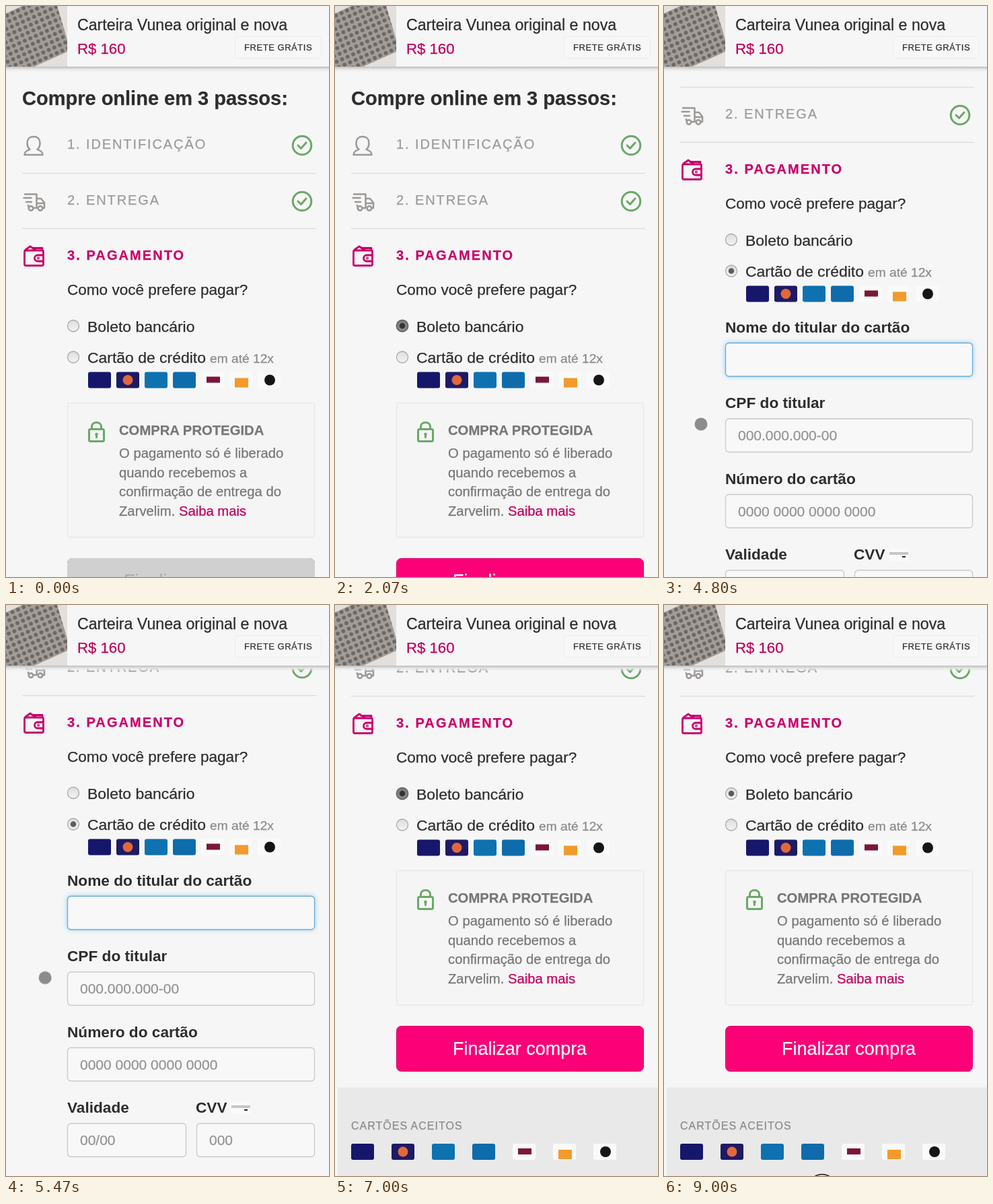
Write an HTML page that moves like this. It is 480 px wide and 848 px high and loops after 9.07 s.

```html
<!DOCTYPE html>
<html lang="pt-BR">
<head>
<meta charset="utf-8">
<title>Pagamento</title>
<style>
  html, body { margin: 0; width: 100%; height: 100%; overflow: hidden; background: #f6f6f6; }
  svg { display: block; width: 480px; height: 848px; }
  text {
    font-family: "Liberation Sans", Arial, Helvetica, sans-serif; white-space: pre;
    color: #2d2d2d; fill: currentColor; stroke: currentColor; stroke-width: .25px;
  }
  .step { font-size: 20px; letter-spacing: 1.9px; color: #9a9a9a; }
  .step.on { font-weight: bold; letter-spacing: 2.07px; color: #c8006b; }
  .option { font-size: 22.95px; }
  .note { font-size: 20.25px; color: #777; }
  .link { color: #c1005f; fill: currentColor; stroke: currentColor; }
  .label { font-size: 22.65px; font-weight: bold; stroke: none; }
  .hint { font-size: 21px; color: #939393; }
  .muted { color: #8a8a8a; }
  .icon { fill: none; stroke: #9c9896; stroke-width: 2.5; stroke-linejoin: round; stroke-linecap: round; }
  .icon.pink { stroke: #c8006b; stroke-width: 2.8; }
  .icon.green { stroke: #6aa967; stroke-width: 3; }
  .rule { stroke: #dedede; stroke-width: 1.5; }
  .field { fill: #f8f8f8; stroke: #c9c9c9; stroke-width: 1.3; }

  .anim { animation: 9070ms infinite; }
  .swap { animation-timing-function: step-end; }
  #page { animation-name: scroll; }
  #disabled { animation-name: disabled; }
  #protected { animation-name: protect; }
  .slip { animation-name: slip; }
  .card { animation-name: card; }
  #cursor { animation-name: move; }
  #dot { animation-name: dot; }
  #ring { animation-name: ring; }

  @keyframes scroll {
    0%, 29.8% { transform: translateY(0); animation-timing-function: ease-out; }
    33.7%, 54% { transform: translateY(-128px); animation-timing-function: ease-out; }
    57.9%, 70.5% { transform: translateY(-196px); }
    70.6%, 100% { transform: translateY(-195px); }
  }
  @keyframes disabled { 0% { opacity: 1; } 21%, 100% { opacity: 0; } }
  @keyframes protect { 0% { opacity: 1; } 44.1% { opacity: 0; } 70.6%, 100% { opacity: 1; } }
  @keyframes slip { 0% { opacity: 0; } 21% { opacity: 1; } 44.1% { opacity: 0; } 70.6%, 100% { opacity: 1; } }
  @keyframes card { 0% { opacity: 0; } 44.1% { opacity: 1; } 70.6%, 100% { opacity: 0; } }
  @keyframes move {
    0%, 5% { transform: translate(250px, 880px); animation-timing-function: ease-in-out; }
    16.5%, 23.7% { transform: translate(100px, 475px); animation-timing-function: ease-in-out; }
    28.7%, 29.8% { transform: translate(63px, 652px); animation-timing-function: ease-out; }
    33.7%, 36.4% { transform: translate(62px, 517px); animation-timing-function: ease-in-out; }
    41.9%, 46.9% { transform: translate(100px, 393px); animation-timing-function: ease-in-out; }
    52.8%, 54% { transform: translate(55px, 621px); animation-timing-function: ease-out; }
    57.9%, 60.1% { transform: translate(58px, 554px); animation-timing-function: ease-in; }
    66.92% { transform: translate(101px, 310px); animation-timing-function: ease-out; }
    68.6%, 83.8% { transform: translate(100px, 280px); animation-timing-function: ease-in; }
    87.43% { transform: translate(138px, 357px); animation-timing-function: linear; }
    92.6% { transform: translate(215px, 790px); animation-timing-function: ease-out; }
    97%, 100% { transform: translate(235px, 867px); }
  }
  @keyframes dot {
    0% { opacity: 1; } 29.2% { opacity: 0; } 36.4% { opacity: 1; }
    53.8% { opacity: 0; } 60.1% { opacity: 1; } 93.5%, 100% { opacity: 0; }
  }
  @keyframes ring {
    0% { opacity: 0; } 29.2% { opacity: 1; } 36.4% { opacity: 0; }
    53.8% { opacity: 1; } 60.1% { opacity: 0; } 93.5%, 100% { opacity: 1; }
  }
</style>
</head>
<body>
<svg viewBox="0 0 480 848">
  <defs>
    <linearGradient id="shade" x2="0" y2="1">
      <stop stop-color="#bdbdbd"/><stop offset=".4" stop-color="#e2e2e2"/><stop offset="1" stop-color="#f6f6f6" stop-opacity="0"/>
    </linearGradient>
    <linearGradient id="knob" x2="0" y2="1">
      <stop stop-color="#dedede"/><stop offset="1" stop-color="#f3f3f3"/>
    </linearGradient>
    <pattern id="leather" width="9" height="9" patternUnits="userSpaceOnUse" patternTransform="rotate(-24)">
      <rect width="9" height="9" fill="#a39e99"/>
      <circle cx="4.5" cy="4.5" r="3" fill="#6c6763"/>
    </pattern>
    <filter id="glow" x="-10%" y="-40%" width="120%" height="180%"><feGaussianBlur stdDeviation="3.5"/></filter>
    <circle id="radio" r="8.5" fill="url(#knob)" stroke="#a9a9a9" stroke-width="1.3"/>
    <circle id="bullet" r="4.3" fill="#5c5c5c"/>
    <g id="check" class="icon green"><circle r="13.8"/><path d="M-6 0l4.5 4.5L6-4"/></g>
    <rect id="badge" width="34" height="24" rx="3"/>
  </defs>

  <rect width="480" height="848" fill="#f6f6f6"/>

  <g id="page" class="anim">
    <text x="24" y="147" font-size="29" font-weight="bold">Compre online em 3 passos:</text>

    <path class="icon" d="M41 194c-6 0-9.500 4-9.500 9.500 0 4 1.500 7.500 4 9.500-3 1.500-8 2-8 8h27c0-6-5-6.500-8-8 2.500-2 4-5.500 4-9.500 0-5.500-3.500-9.500-9.500-9.500z"/>
    <text class="step" x="91" y="212">1. IDENTIFICAÇÃO</text>
    <use href="#check" x="440" y="207"/>
    <path class="rule" d="M24 248.500H461M24 330.500H461"/>

    <g class="icon">
      <path d="M28 279.500H45.500V300H41M45.500 286h6.500l5 6v8h-3M26.500 285h11M30 291h8M33 296v1.500M46 293h10"/>
      <circle cx="37" cy="300.500" r="3.300"/><circle cx="51" cy="300.500" r="3.300"/>
    </g>
    <text class="step" x="91" y="294.500">2. ENTREGA</text>
    <use href="#check" x="440" y="290"/>

    <g class="icon pink">
      <rect x="27.500" y="363" width="28" height="22.500" rx="2"/>
      <path d="M29 362l7-5 8 5.500M39 359.500h15v3M55 370H47a4.500 4.500 0 0 0 0 9h8"/>
      <circle cx="48" cy="374.500" r=".600"/>
    </g>
    <text class="step on" x="91" y="377">3. PAGAMENTO</text>

    <text x="91" y="429" font-size="22.550">Como você prefere pagar?</text>
    <use href="#radio" x="100" y="475"/>
    <use href="#bullet" x="100" y="475" class="anim swap slip"/>
    <text class="option" x="121" y="483.500">Boleto bancário</text>
    <use href="#radio" x="100" y="521.500"/>
    <use href="#bullet" x="100" y="521.500" class="anim swap card"/>
    <text class="option" x="121" y="530">Cartão de crédito</text>
    <text class="muted" x="303" y="530" font-size="19.200">em até 12x</text>
    <g class="badges" data-x="122" data-y="543.500" data-step="42"></g>

    <g id="protected" class="anim swap">
      <rect x="91.500" y="589.500" width="367" height="199.500" rx="3" fill="#f5f5f5" stroke="#e8e8e8" stroke-width="1.300"/>
      <g class="icon green">
        <rect x="123.500" y="628.500" width="22" height="18" rx="2"/>
        <path d="M127.500 628v-4a7 5.500 0 0 1 14 0v4M134.500 636v4.500"/>
        <circle cx="134.500" cy="636" r=".800"/>
      </g>
      <text class="note" x="168" y="637" font-weight="bold">COMPRA PROTEGIDA</text>
      <text class="note" x="168" y="671">O pagamento só é liberado</text>
      <text class="note" x="168" y="699.500">quando recebemos a</text>
      <text class="note" x="168" y="728">confirmação de entrega do</text>
      <text class="note" x="168" y="756.500">Zarvelim. <tspan class="link">Saiba mais</tspan></text>

      <rect x="91.500" y="820.500" width="367" height="67" rx="7" fill="#fb0077" stroke="#dc006b"/>
      <text x="175" y="863" font-size="26.950" style="color:#fff">Finalizar compra</text>
      <g id="disabled" class="anim swap">
        <rect x="91" y="820" width="368" height="68" rx="7" fill="#d0d0d0"/>
        <text x="175" y="863" font-size="26.950" style="color:#aeaeae">Finalizar compra</text>
      </g>

      <rect x="4" y="911.500" width="476" height="160" fill="#e9e9e9"/>
      <text class="muted" x="24" y="974" font-size="16" letter-spacing="1">CARTÕES ACEITOS</text>
      <g class="badges" data-x="24" data-y="995" data-step="60"></g>
    </g>

    <g class="anim swap card">
      <text class="label" x="91" y="613">Nome do titular do cartão</text>
      <rect x="91" y="628" width="368" height="50" rx="5" fill="#8fc9f2" filter="url(#glow)"/>
      <rect class="field" x="91.500" y="628.500" width="367" height="49.500" rx="5" style="stroke:#6cacd9"/>
      <text class="label" x="91" y="725">CPF do titular</text>
      <rect class="field" x="91.500" y="741" width="367" height="49.500" rx="5"/>
      <text class="hint" x="110" y="773">000.000.000-00</text>
      <text class="label" x="91" y="838">Número do cartão</text>
      <rect class="field" x="91.500" y="853.500" width="367" height="49.500" rx="5"/>
      <text class="hint" x="110" y="885.500">0000 0000 0000 0000</text>
      <text class="label" x="91" y="950">Validade</text>
      <rect class="field" x="91.500" y="966" width="176" height="49.500" rx="5"/>
      <text class="hint" x="110" y="998">00/00</text>
      <text class="label" x="282" y="950">CVV</text>
      <rect x="335" y="934" width="28" height="18" rx="2" fill="#fbfbfb"/>
      <path d="M335 939h28v4h-28z" fill="#c6c6c6"/>
      <path d="M354 945h5v2h-5z" fill="#222"/>
      <rect class="field" x="283.500" y="966" width="175" height="49.500" rx="5"/>
      <text class="hint" x="302" y="998">000</text>
    </g>
  </g>

  <rect y="90" width="480" height="9" fill="url(#shade)"/>
  <rect width="480" height="90" fill="#f6f6f6"/>
  <rect width="91" height="90" fill="#e2dfdc"/>
  <path d="M0 11L24 0H76L91 50V68L42 90H0z" fill="url(#leather)"/>
  <text x="106" y="36" font-size="23.180">Carteira Vunea original e nova</text>
  <text class="link" x="106" y="70.500" font-size="22.200">R$ 160</text>
  <rect x="340.500" y="45.500" width="128" height="32" rx="3" fill="#f7f7f7" stroke="#ececec"/>
  <text x="354" y="66" font-size="13" letter-spacing=".550">FRETE GRÁTIS</text>

  <g id="cursor" class="anim">
    <circle id="dot" class="anim swap" r="9.500" fill="#000" fill-opacity=".43"/>
    <g id="ring" class="anim swap">
      <circle r="21.500" fill="none" stroke="#111" stroke-width="1.600"/>
      <path d="M0-1V13l3-3 2.500 6 2.500-1-2.500-5.500H10z" fill="#111" stroke="#fff" stroke-width=".800"/>
    </g>
  </g>
</svg>
<script>
  const badgeRow = (x, y, step) => {
    const at = i => x + i * step;
    const badges = ['#16176b', '#1d1a66', '#0e72b0', '#0e6cab', '#fafafa', '#fafafa', '#fafafa']
      .map((fill, i) => `<use href="#badge" x="${at(i)}" y="${y}" fill="${fill}"/>`);
    return badges.join('') +
      `<circle cx="${at(1) + 17}" cy="${y + 12}" r="7.5" fill="#e2683c"/>` +
      `<rect x="${at(4) + 8}" y="${y + 7}" width="20" height="9" fill="#7d1736"/>` +
      `<rect x="${at(5) + 8}" y="${y + 9}" width="20" height="14" fill="#f39a2b"/>` +
      `<circle cx="${at(6) + 18}" cy="${y + 12}" r="8" fill="#161616"/>`;
  };
  for (const row of document.querySelectorAll('.badges')) {
    const { x, y, step } = row.dataset;
    row.innerHTML = badgeRow(+x, +y, +step);
  }
</script>
</body>
</html>
```
